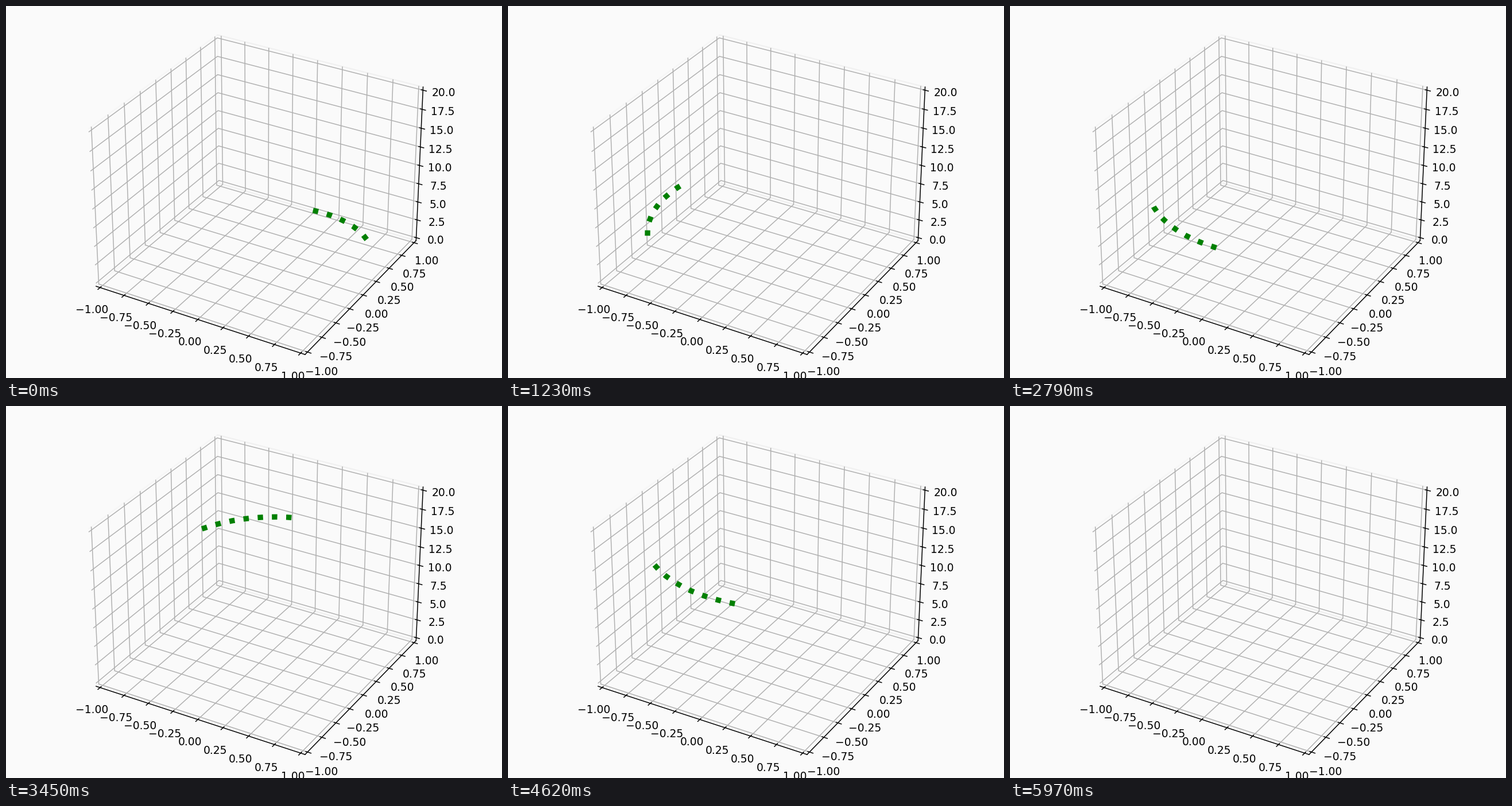
Recreate the animation shown at these times as a matplotlib script. Size 864x648 px, loop 6 s.

```python
import numpy as np
import matplotlib.pyplot as plt
from matplotlib.animation import FuncAnimation

BG = "#fafafa"
FRAMES, INTERVAL = 200, 30
TAIL = 10  # points visible at once

t = np.arange(FRAMES) * 0.1
helix = np.array([np.sin(t), np.cos(t), t])

fig = plt.figure(figsize=(6.4, 4.8), dpi=135, facecolor=BG)
ax = fig.add_axes([0, 0, 1, 1], projection="3d", facecolor=BG)


def padded(lo, hi):
    pad = (hi - lo) / 48
    return lo - pad, hi + pad


ax.set_xlim(*padded(-1, 1))
ax.set_ylim(*padded(-1, 1))
ax.set_zlim(*padded(0, 20))
for axis in (ax.xaxis, ax.yaxis, ax.zaxis):
    axis.pane.set_facecolor(BG)

line, = ax.plot([], [], [], ":", color="green", lw=5)


def update(i):
    line.set_data_3d(*helix[:, i:i + TAIL])
    return line,


anim = FuncAnimation(fig, update, frames=FRAMES, interval=INTERVAL,
                     repeat=True, repeat_delay=0)
plt.show()
```
